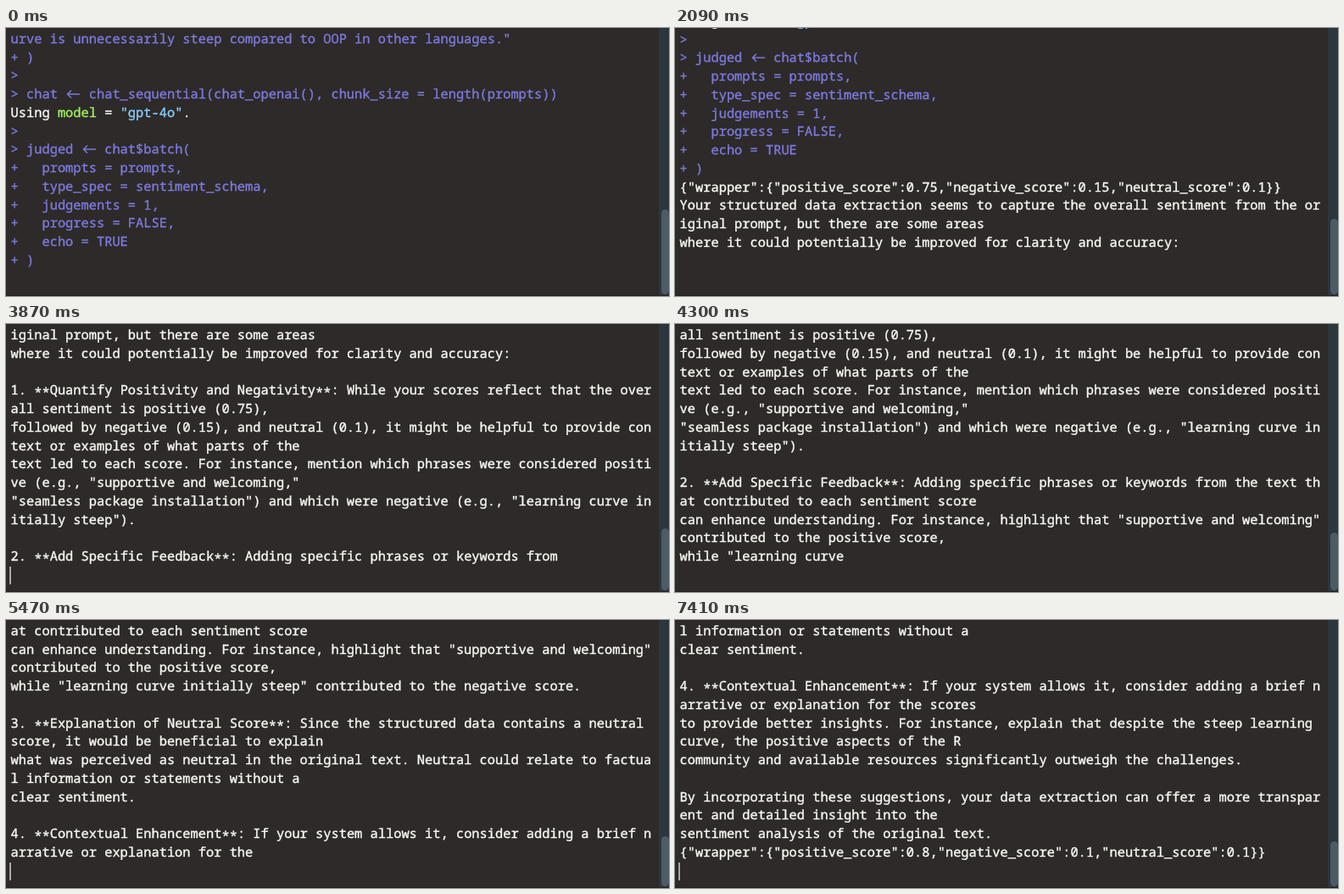
Write an HTML page that moves like this. It is 782 by 316 pixels and loops after 8 s.

```html
<!DOCTYPE html>
<html lang="en">
<head>
<meta charset="utf-8">
<title>Console</title>
<style>
  html, body { margin: 0; width: 100%; height: 100%; overflow: hidden; background: #2d2a29; }
  #stage { position: relative; width: 782px; height: 316px; overflow: hidden; background: #2d2a29; }
  #stage > div { position: absolute; }
  #rows {
    left: 5.6px; top: 2.2px; color: #f8f8f2; white-space: pre;
    font: 500 15.375px/21.75px "Noto Sans Mono", "DejaVu Sans Mono", monospace;
    font-variant-ligatures: none; text-rendering: geometricPrecision;
    -webkit-text-stroke: 0.4px currentColor;
  }
  #rows div { height: 21.75px; }
  .code { color: #7c79dc; }
  .key { color: #a0ee60; }
  .str { color: #8acdfa; }
  .stars { position: relative; top: 3px; }
  .arrow { display: inline-block; width: 2ch; height: 12px; vertical-align: -1px; }
  .arrow path { fill: none; stroke: currentColor; stroke-width: 1.5; }
  #caret { left: 4px; width: 2px; height: 21px; background: #aaa8a6; }
  #track { left: 770px; top: 0; width: 12px; height: 316px; background: #2b373d; }
  #thumb { left: 773px; width: 9px; border-radius: 5px; background: #4d5b65; }
  #edge { left: 0; top: 315px; width: 782px; height: 1px; background: #242121; }
</style>
</head>
<body>
<div id="stage">
  <div id="rows"></div>
  <div id="track"></div>
  <div id="thumb"></div>
  <div id="edge"></div>
  <div id="caret"></div>
</div>
<script>
const TEXT = `+   "OOP in R is much harder than it needs to be for new users, and the learning c
urve is unnecessarily steep compared to OOP in other languages."
+ )
>
> chat <- chat_sequential(chat_openai(), chunk_size = length(prompts))
Using model = "gpt-4o".
>
> judged <- chat$batch(
+   prompts = prompts,
+   type_spec = sentiment_schema,
+   judgements = 1,
+   progress = FALSE,
+   echo = TRUE
+ )
{"wrapper":{"positive_score":0.75,"negative_score":0.15,"neutral_score":0.1}}
Your structured data extraction seems to capture the overall sentiment from the or
iginal prompt, but there are some areas
where it could potentially be improved for clarity and accuracy:

1. **Quantify Positivity and Negativity**: While your scores reflect that the over
all sentiment is positive (0.75),
followed by negative (0.15), and neutral (0.1), it might be helpful to provide con
text or examples of what parts of the
text led to each score. For instance, mention which phrases were considered positi
ve (e.g., "supportive and welcoming,"
"seamless package installation") and which were negative (e.g., "learning curve in
itially steep").

2. **Add Specific Feedback**: Adding specific phrases or keywords from the text th
at contributed to each sentiment score
can enhance understanding. For instance, highlight that "supportive and welcoming"
contributed to the positive score,
while "learning curve initially steep" contributed to the negative score.

3. **Explanation of Neutral Score**: Since the structured data contains a neutral
score, it would be beneficial to explain
what was perceived as neutral in the original text. Neutral could relate to factua
l information or statements without a
clear sentiment.

4. **Contextual Enhancement**: If your system allows it, consider adding a brief n
arrative or explanation for the scores
to provide better insights. For instance, explain that despite the steep learning
curve, the positive aspects of the R
community and available resources significantly outweigh the challenges.

By incorporating these suggestions, your data extraction can offer a more transpar
ent and detailed insight into the
sentiment analysis of the original text.
{"wrapper":{"positive_score":0.8,"negative_score":0.1,"neutral_score":0.1}}`;

const LINES = TEXT.split("\n");
const LOOP = 8000, PITCH = 21.75, LAST_SLOT = 13, USING_ROW = 5, FIRST_REPLY = 14;

// time, row, column, steps since the previous entry, rows the scroll lags behind
const KEYS = [
  [0, 13, 3], [450, 14, 41], [600, 14, 77], [1050, 14, 77],
  [1500, 15, 48], [1790, 16, 28, 2], [2090, 18, 0], [3140, 23, 59, 7],
  [3870, 28, 70, 5], [4740, 36, 8, 6, 1], [5470, 41, 31, 5], [6510, 48, 40, 7],
  [6960, 48, 40], [7260, 49, 41], [7410, 49, 75]
];

const $ = id => document.getElementById(id);
const starts = [];
LINES.reduce((sum, line, i) => (starts[i] = sum, sum + line.length + 1), 0);

function locate(pos) {
  let row = starts.length - 1;
  while (starts[row] > pos) row--;
  const line = LINES[row], col = Math.round(pos - starts[row]);
  if (line[0] === "{") return [row, col];
  const space = line.indexOf(" ", col);
  return [row, space < 0 ? line.length : space];
}

function buildSteps() {
  const steps = [];
  KEYS.forEach(([t, row, col, count = 1, lag = 0], i) => {
    const end = starts[row] + col;
    const [t0, row0, col0] = KEYS[i - 1] || [t, row, col];
    const begin = starts[row0] + col0;
    for (let n = 1; n < count; n++) {
      const k = n / count;
      const [r, c] = locate(begin + (end - begin) * k);
      steps.push({ t: Math.floor((t0 + (t - t0) * k) / 10) * 10, row: r, col: c, lag: 0 });
    }
    steps.push({ t, row, col, lag });
  });
  return steps;
}

const ARROW = '<svg class="arrow" viewBox="0 0 18.45 12"><path d="M17 6H2.5M7 1.5L2.5 6L7 10.5"/></svg>';

function markup(text, row) {
  let html = text.replace(/&/g, "&amp;").replace(/</g, "&lt;").replace(/>/g, "&gt;")
    .replace("&lt;-", ARROW)
    .replace(/\*\*/g, '<span class="stars">**</span>');
  if (row === USING_ROW) {
    html = html.replace("model", '<span class="key">model</span>')
      .replace(/"gpt.*"/, '<span class="str">$&</span>');
  }
  return html;
}

const rowEls = LINES.map((line, i) => {
  const el = document.createElement("div");
  if (i < FIRST_REPLY && i !== USING_ROW) el.className = "code";
  return $("rows").appendChild(el);
});

function show({ t, row, col, lag }) {
  rowEls.forEach((el, i) => {
    const text = i < row ? LINES[i] : i === row ? LINES[i].slice(0, col) : "";
    el.innerHTML = markup(text, i);
  });

  const caretRow = row + 1;
  const scroll = Math.floor((caretRow - LAST_SLOT - lag) * PITCH + 0.49);
  $("rows").style.transform = `translateY(${-scroll}px)`;

  const caret = $("caret").style;
  caret.top = Math.round(3.6 + caretRow * PITCH - scroll) + "px";
  caret.visibility = Math.floor((t - 410) / 500) % 2 === 0 ? "visible" : "hidden";

  const total = caretRow + 27;
  const height = Math.floor(4130 / total);
  $("thumb").style.height = height + "px";
  $("thumb").style.top = Math.round(314 - height - lag * 300 / total) + "px";
}

const STEPS = buildSteps();
const origin = performance.now();
let shown = null;

function tick() {
  const t = (performance.now() - origin) % LOOP;
  let i = STEPS.length - 1;
  while (STEPS[i].t > t) i--;
  if (i !== shown) show(STEPS[shown = i]);
  requestAnimationFrame(tick);
}
tick();
</script>
</body>
</html>
```
